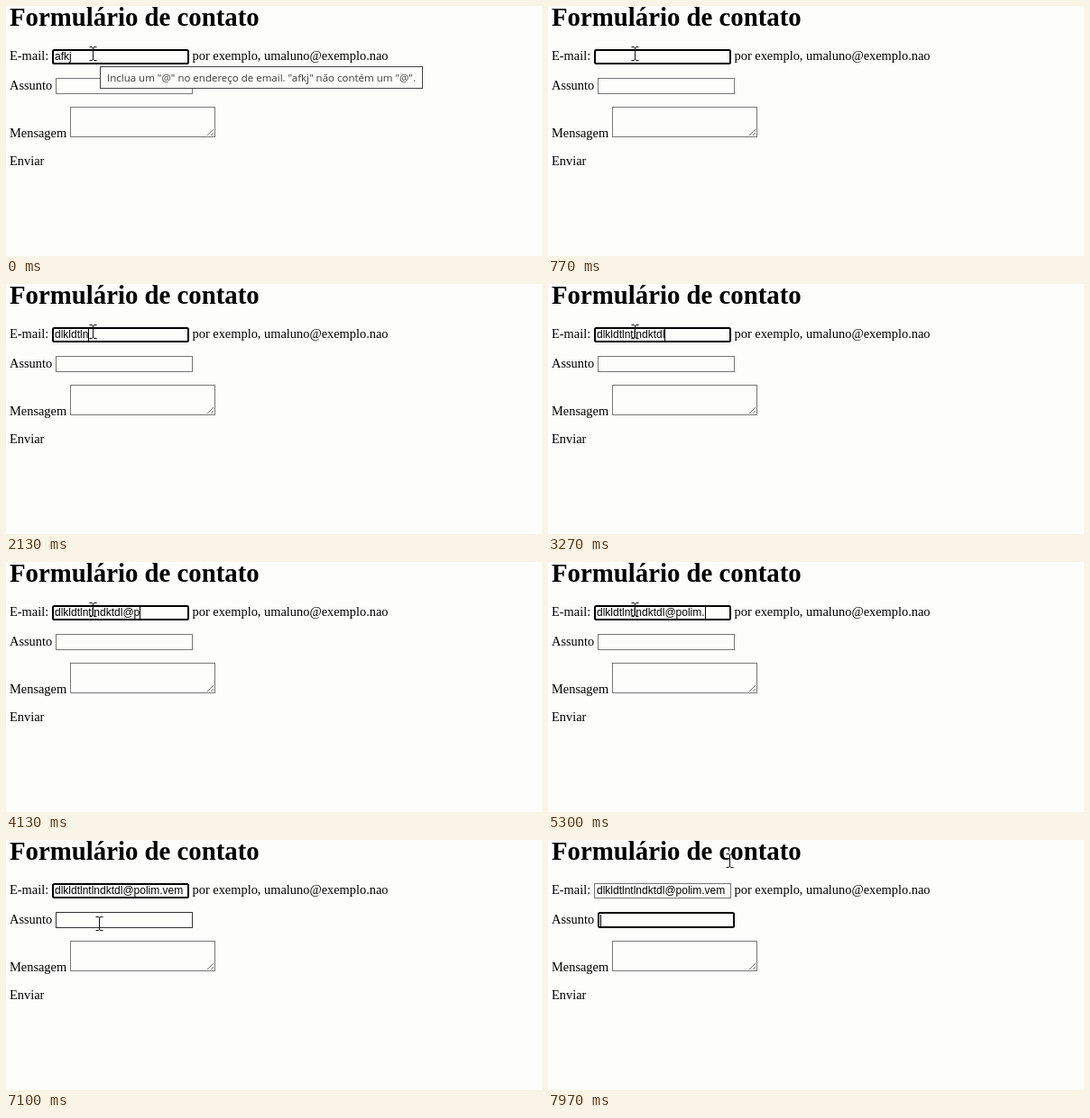
Write an HTML page that moves like this. It is 594 px wide and 278 px high and loops after 8000 ms.

```html
<!DOCTYPE html>
<html lang="pt">
<head>
<meta charset="utf-8">
<title>Formulário de contato</title>
<style>
html, body { margin: 0; width: 100%; height: 100%; overflow: hidden; background: #fdfefb; }
svg { display: block; width: 594px; height: 278px; }
text { font: 14.4px "Liberation Serif", serif; white-space: pre; }
.title { font-size: 28.8px; font-weight: bold; }
.value { font: 12px "Liberation Sans", sans-serif; }
.tip text { font: 11.5px "Open Sans", sans-serif; fill: #3a3a3a; }
.tip rect { fill: #fdfefb; stroke: #444; }
.box { fill: #fdfefb; stroke: #767676; }
.box.hover { stroke: #333; }
.box.focus { stroke: #000; stroke-width: 2; }
.line { fill: none; stroke: #777; }
.caret { fill: #000; }
.pointer { fill: none; stroke: #111; }
</style>
</head>
<body>
<svg viewBox="0 0 594 278">
  <text class="title" x="4" y="22">Formulário de contato</text>
  <text x="4" y="60">E-mail:</text>
  <text x="206.5" y="60">por exemplo, umaluno@exemplo.nao</text>
  <text x="4" y="93">Assunto</text>
  <text x="4" y="146">Mensagem</text>
  <text x="4" y="177">Enviar</text>
  <rect class="box" id="email"/>
  <text class="value" id="value" x="54" y="60"></text>
  <rect class="box" id="subject"/>
  <rect class="box" x="71.5" y="112.5" width="160" height="33"/>
  <path class="line" d="M223 144l7-7M227 144l3-3"/>
  <rect class="caret" id="caret" width="1" height="13"/>
  <g class="tip" id="tip">
    <rect x="104.5" y="67.5" width="357" height="24"/>
    <text x="112" y="83.5">Inclua um "@" no endereço de email. "afkj" não contém um "@".</text>
  </g>
  <path class="pointer" id="pointer" d="M-3.5-7.5H-1L.5-6.5 2-7.5H4.5M.5-6.5V6.5M-3.5 7.5H-1L.5 6.5 2 7.5H4.5"/>
</svg>
<script>
const LOOP = 8000, FOCUS_SUBJECT = 7480, BLINK = 500;
const [email, subject, value, caret, tip, pointer] =
  ['email', 'subject', 'value', 'caret', 'tip', 'pointer'].map(id => document.getElementById(id));

// Each edit is a time and the text in the field from then on.
const edits = [];
['afk', 'af', 'a', ''].forEach((text, i) => edits.push([130 + i * 40, text]));
let typed = '';
const type = (start, step, text) =>
  [...text].forEach((ch, i) => edits.push([start + i * step, typed += ch]));
type(1200, 125, 'dlkldtlntlndktdl');
type(3480, 0, '@');
type(4030, 238, 'polim.');
type(5420, 70, 'vem');

// Pointer moves: start, end, from, to.
const moves = [
  [6650, 7030, [96, 53], [103, 93]],
  [7540, 7930, [103, 93], [201, 23]]
];

function pointerAt(t) {
  let pos = moves[0][2];
  for (const [start, end, from, to] of moves) {
    if (t < start) break;
    const p = Math.min(1, (t - start) / (end - start));
    const eased = p * p * (3 - 2 * p);
    pos = from.map((v, i) => Math.round(v + (to[i] - v) * eased));
  }
  return pos;
}

function drawBox(el, x, y, height, focused) {
  const inset = focused ? 1 : 0.5;
  const attrs = { x: x + inset, y: y + inset, width: 152 - 2 * inset,
                  height: height - 2 * inset, rx: focused ? 1.5 : 0 };
  for (const name in attrs) el.setAttribute(name, attrs[name]);
  el.classList.toggle('focus', focused);
}

function render(t) {
  const [lastEdit, text] = edits.filter(e => e[0] <= t).pop() || [-BLINK, 'afkj'];
  const onSubject = t >= FOCUS_SUBJECT;
  const [px, py] = pointerAt(t);

  value.textContent = text;
  tip.style.display = t < edits[0][0] ? '' : 'none';
  drawBox(email, 51, 48, 17, !onSubject);
  drawBox(subject, 55, 80, 18, onSubject);
  subject.classList.toggle('hover', px > 55 && px < 207 && py > 80 && py < 98);

  const since = t - (onSubject ? FOCUS_SUBJECT : lastEdit);
  caret.style.display = since % (2 * BLINK) < BLINK ? '' : 'none';
  caret.setAttribute('x', onSubject ? 58 : Math.round(54 + value.getComputedTextLength()));
  caret.setAttribute('y', onSubject ? 83 : 50);
  pointer.setAttribute('transform', `translate(${px} ${py})`);
}

const begin = performance.now();
function tick() {
  render((performance.now() - begin) % LOOP);
  requestAnimationFrame(tick);
}
tick();
</script>
</body>
</html>
```
